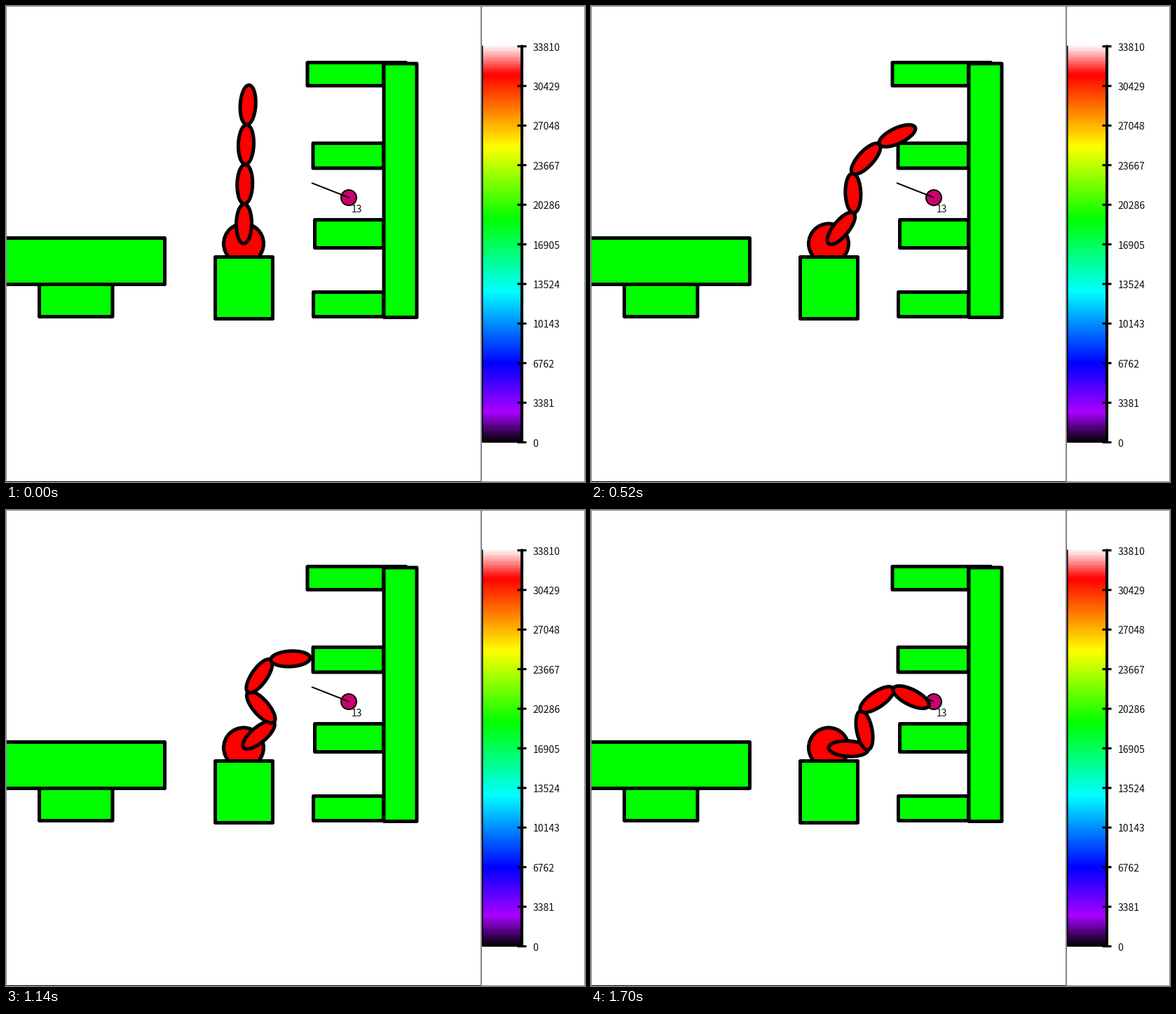
A matplotlib script that plays this animation: 826x678 px, repeating every 1.72 s.

```python
import colorsys

import numpy as np
import matplotlib.pyplot as plt
from matplotlib.animation import FuncAnimation
from matplotlib.patches import Circle, Ellipse, Rectangle

W, H, DPI = 826, 678, 64
PT = 72 / DPI  # points per pixel
FRAMES, INTERVAL = 86, 20
FONT = ["Noto Sans CJK JP", "Liberation Sans"]
GREEN, RED, GRAY = "#00ff00", "#ff0000", "#82828c"

BASE, LINK, GIRTH = np.array([338.5, 338]), 56.5, 22

# Each joint turns at a steady rate between (step, degrees) turning points,
# measured against the link before it
TURNS = [
    [(0, 1), (16, 28), (27, 40.5), (46, 27), (57, 50), (85, 93)],
    [(0, 0.5), (75, -120), (85, -104)],
    [(0, 0.5), (45, 77), (67, 75.5), (85, 66.5)],
    [(0, 1.5), (26, 22), (40, 26.5), (57, 52), (85, 61)],
]

plt.rcParams["path.snap"] = False
fig = plt.figure(figsize=(W / DPI, H / DPI), dpi=DPI, facecolor="white")
ax = fig.add_axes([0, 0, 1, 1])
ax.axis("off")


def add(patch, fill, z, width=5):
    patch.set(facecolor=fill, edgecolor="black", linewidth=width * PT,
              joinstyle="round", zorder=z)
    return ax.add_patch(patch)


def box(x0, y0, x1, y1):
    add(Rectangle((x0, y0), x1 - x0, y1 - y0), GREEN, 2)


def line(x0, y0, x1, y1, color="black", width=1, z=3, cap="butt"):
    ax.plot([x0, x1], [y0, y1], color=color, lw=width * PT, zorder=z,
            solid_capstyle=cap)


def label(x, y, text):
    ax.text(x, y, text, family=FONT, fontsize=14 * PT, color="#101010",
            va="baseline", zorder=8)


def draw_obstacles():
    box(-12, 330, 226, 396)   # table
    box(47, 396, 151.5, 442)
    box(298, 357, 380, 445)   # arm stand
    for x, y, depth in (429.5, 80, 33), (437.5, 195, 35.5), (440, 304, 40), (438, 407, 35):
        box(x, y, 538, y + depth)
    box(538.5, 81.5, 585.5, 443)
    line(538, 80, 570, 80, width=5, cap="round")


def draw_goal():
    add(Circle((488.5, 272.5), 11), "#cc0070", 4, 2)
    line(435.5, 251.5, 489, 272.5, width=2, z=5)
    label(492.5, 293, "13")


def scale_color(t):
    """White to red, through the hues to violet, then to black."""
    hue = np.clip((t - 0.073) * 329, 0, 280) / 360
    return colorsys.hsv_to_rgb(hue, min(t / 0.073, 1), min((1 - t) / 0.076, 1))


def draw_scale(top=56, bottom=621, bands=165):
    colors = [[scale_color((i + 0.5) / bands)] for i in range(bands)]
    ax.imshow(np.array(colors), extent=(679, 735, bottom, top),
              aspect="auto", interpolation="nearest", zorder=2)
    line(679, top, 679, bottom, width=2)
    line(679, 620.5, 736, 620.5, width=2)
    line(735.5, top - 1, 735.5, bottom + 1, width=4)
    for k in range(11):
        y = 57 + 56.4 * k
        line(729, y, 742, y, width=3)
        label(751, y + 6, str(3381 * (10 - k)))


def draw_frame():
    right, low = W - 1, H - 1
    line(0, 0, right, 0, GRAY)
    line(0, 0, 0, low, GRAY)
    line(right, 0, right, low, GRAY)
    line(678, low, right, low, GRAY)
    line(677.5, 0, 677.5, low, GRAY, 2)
    line(0, low, 677, low)


draw_obstacles()
draw_goal()
draw_scale()
draw_frame()
add(Circle(BASE, 28.5), RED, 1)
links = [add(Ellipse(BASE, GIRTH, LINK), RED, 6 + i / 10)
         for i in range(len(TURNS))]
ax.set(xlim=(-0.5, W - 0.5), ylim=(H - 0.5, -0.5))


def update(step):
    headings = np.cumsum([np.interp(step, *zip(*turns)) for turns in TURNS])
    joint = BASE
    for link, heading in zip(links, headings):
        a = np.radians(heading)
        reach = LINK * np.array([np.sin(a), -np.cos(a)])
        link.set(center=joint + reach / 2, angle=heading)
        joint = joint + reach
    return links


anim = FuncAnimation(fig, update, frames=FRAMES, interval=INTERVAL,
                     repeat=True, repeat_delay=0)
plt.show()
```
